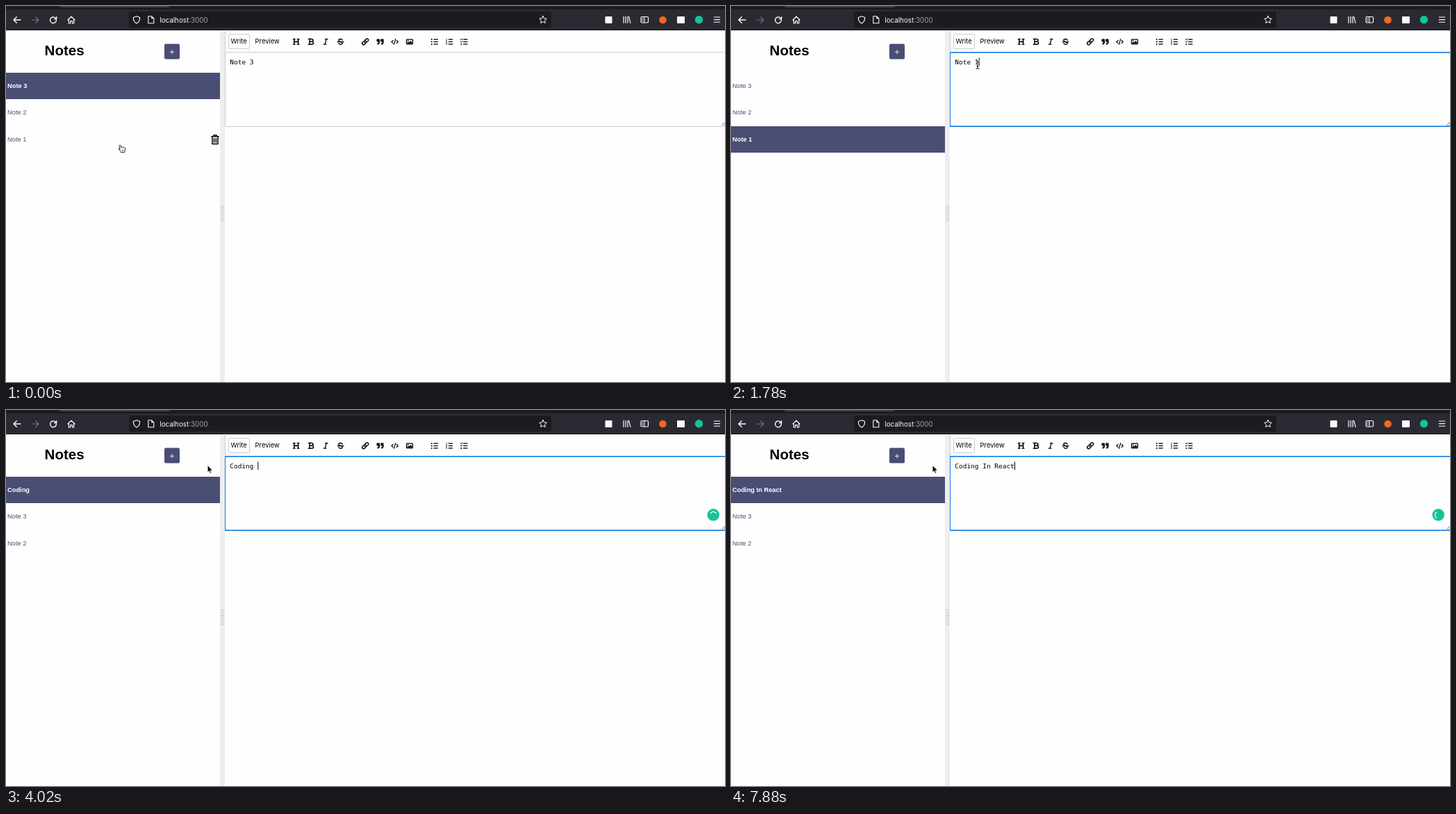
An HTML page with a canvas for the animation above (8 s loop, 1035 by 541 pixels).

```html
<!DOCTYPE html>
<html lang="en">
<head>
<meta charset="utf-8">
<title>Notes</title>
<style>
html, body { margin: 0; width: 100%; height: 100%; overflow: hidden; background: #fff; }
canvas { display: block; width: 1035px; height: 541px; }
</style>
</head>
<body>
<canvas id="stage" width="1035" height="541"></canvas>
<script>
const ctx = document.getElementById('stage').getContext('2d');
const LOOP = 8000;
const SANS = '"Liberation Sans", Arial, sans-serif';
const UI = 'Inter, sans-serif';
const MONO = '"DejaVu Sans Mono", monospace';
const INDIGO = '#4a4e74', INK = '#000', PALE = '#fbfbfe', BORDER = '#c8ccd0', TEAL = '#15c39a';
const CHAR = 5.71, TEXT_X = 322.3;

// Runs of evenly spaced picture changes: first, last, count
const RUNS = [[0, 0, 1], [450, 750, 2], [1050, 1930, 7], [2110, 3120, 7], [3270, 4310, 8],
  [4460, 5500, 8], [5650, 6690, 8], [6830, 7730, 7], [7880, 7880, 1]];
const TYPED = 'Coding In React';
const KEYS = [3120, 3270, 3420, 3570, 3720, 3870, 4020, 4460, 4610, 4910, 5200, 5500, 6095, 6390, 6540];
const FOCUS = 1650, SPINNER = 2610, SPIN = 766, BLINK = 567;

// ---------- drawing helpers ----------
function rect(x, y, w, h, color) {
  ctx.fillStyle = color;
  ctx.fillRect(x, y, w, h);
}
function round(x, y, w, h, r, color) {
  ctx.fillStyle = color;
  ctx.beginPath();
  ctx.roundRect(x, y, w, h, r);
  ctx.fill();
}
function frame(x, y, w, h, r, color, width) {
  ctx.strokeStyle = color;
  ctx.lineWidth = width;
  ctx.beginPath();
  ctx.roundRect(x, y, w, h, r);
  ctx.stroke();
}
function disc(x, y, r, color) {
  ctx.fillStyle = color;
  ctx.beginPath();
  ctx.arc(x, y, r, 0, 7);
  ctx.fill();
}
function arc(x, y, r, a, b, color, width) {
  ctx.strokeStyle = color;
  ctx.lineWidth = width;
  ctx.beginPath();
  ctx.arc(x, y, r, a, b);
  ctx.stroke();
}
function text(str, x, y, font, color, align = 'left') {
  ctx.font = font;
  ctx.fillStyle = color;
  ctx.textAlign = align;
  ctx.fillText(str, x, y);
}
function path(d, x, y, { fill, stroke, width = 1, scale = 1 }) {
  const p = new Path2D(d);
  ctx.save();
  ctx.translate(x, y);
  ctx.scale(scale, scale);
  ctx.lineJoin = ctx.lineCap = 'round';
  if (fill) { ctx.fillStyle = fill; ctx.fill(p); }
  if (stroke) { ctx.strokeStyle = stroke; ctx.lineWidth = width; ctx.stroke(p); }
  ctx.restore();
}
const line = (d, x, y, color, width) => path(d, x, y, { stroke: color, width });

// ---------- browser bar ----------
function browser() {
  rect(0, 0, 1035, 35, '#2b2a33');
  rect(0, 0, 1035, 5, '#1c1b22');
  round(77, -4, 159, 6, 2, '#42414d');
  rect(0, 34, 1035, 1, '#0c0c0d');
  round(177, 8, 608, 23, 3, '#1c1b22');

  line('M10 0H0M4.3-4.3L0 0L4.3 4.3', 11, 20, PALE, 1.4);
  line('M0 0H10M5.7-4.3L10 0L5.7 4.3', 37, 20, '#77767e', 1.2);
  arc(68, 20.3, 4.4, -0.2, 5.3, PALE, 1.4);
  path('M0 0V4.8H-4.8Z', 73.3, 14.4, { fill: PALE });
  line('M-5 0L0-4.8L5 0M-3.7-1V5H-1.4V1.6H1.4V5H3.7V-1', 94, 20, PALE, 1.2);

  line('M0-5L4.7-3.3C4.7 1 3.5 3.6 0 5.4C-3.5 3.6-4.7 1-4.7-3.3Z', 188, 19.7, PALE, 1.1);
  line('M0 0H5L8 3V10H0ZM5 0V3H8', 204.8, 14.8, PALE, 1.1);
  text('localhost', 221.3, 23.5, '9.8px ' + UI, PALE);
  const w = ctx.measureText('localhost').width;
  text(':3000', 221.3 + w, 23.5, '9.8px ' + UI, '#a2a2ab');

  let star = '';
  for (let i = 0; i < 10; i++) {
    const a = i * Math.PI / 5, r = i % 2 ? 2.7 : 5.6;
    star += (i ? 'L' : 'M') + r * Math.sin(a) + ' ' + -r * Math.cos(a);
  }
  line(star + 'Z', 773, 20, PALE, 1);

  round(862.5, 15, 10, 10, 1, PALE);
  line('M0 0V9M3 0V9M6 0V9M7.6 0L10 9', 889, 15.3, PALE, 1.2);
  frame(914, 15.5, 10.5, 8.5, 1.5, PALE, 1.2);
  line('M0 0V8M-3 2H-2M-3 4H-2M-3 6H-2', 919, 15.8, PALE, 1.1);
  disc(945.5, 20, 5.3, '#ee6a1f');
  round(966, 15, 11, 10, 1, PALE);
  disc(997.5, 19.7, 5.7, TEAL);
  line('M0 0H8.5M0 3.6H8.5M0 7.2H8.5', 1019.2, 16, PALE, 1.1);
}

// ---------- sidebar ----------
function trash() {
  line('M0 0H10.4M3.2-.2V-2H7.2V-.2M1.2 .3V10.6H9.2V.3M3.8 3V8.2M6.6 3V8.2', 295.8, 187.8, INK, 1.5);
}
function sidebar(rows, active, hover) {
  text('Notes', 55.6, 71, 'bold 20.5px ' + SANS, INK);
  round(228, 54.5, 22, 22, 2, INDIGO);
  line('M-2.6 0H2.6M0-2.6V2.6', 239, 66.3, '#e8e8ee', 1);
  rows.forEach((name, i) => {
    const y = 96 + i * 38.5, on = i === active;
    if (on) rect(0, Math.floor(y), 308, 38, INDIGO);
    text(name, 2, y + 21.8, (on ? 'bold ' : '') + '9.3px ' + SANS, on ? '#fff' : INDIGO);
  });
  if (hover) trash();
  rect(308, 35, 7, 506, '#eee');
  for (let i = 0; i < 9; i++) rect(309, 287 + i * 2.65, 5, 1, '#c9c9c9');
}

// ---------- editor ----------
function toolbar() {
  rect(315, 36, 1, 138, BORDER);
  rect(315, 66, 720, 1, BORDER);
  rect(315, 173, 720, 1, BORDER);
  frame(320.5, 40.5, 30, 21, 1, BORDER, 1);
  text('Write', 323.5, 54.4, '9.4px ' + UI, INK);
  text('Preview', 358.6, 54.4, '9.4px ' + UI, INK);

  // heading, bold, italic, strike
  line('M1.6 0V7.6M7.4 0V7.6M1.6 3.8H7.4', 413.2, 47.6, INK, 1.6);
  line('M0 0H3.2M5.8 0H9M0 7.6H3.2M5.8 7.6H9', 413.2, 47.6, INK, 1.1);
  line('M1.6 0V7.6M0 0H4.2C7.4 0 7.4 3.6 4.2 3.6H1.6M4.2 3.6C8.2 3.6 8.2 7.6 4.2 7.6H0', 435.4, 47.6, INK, 1.5);
  line('M2.2 0H5.8M0 7.6H3.6M4 0L1.8 7.6', 457.3, 47.6, INK, 1.3);
  line('M7.3 1.6C6.4-.7 2-.6 2 1.9C2 3 3.2 3.6 4.8 4C8.8 5 7.6 7.9 4.9 7.8C3.2 7.8 2.4 7 2 6', 476.9, 47.6, INK, 1.4);
  line('M0 0H9.2', 477, 51.6, INK, 1.1);

  // link, quote, code, image
  line('M4 5.8C2.8 4.6 3 3.4 3.8 2.6L5.5 .9C7.8-1 10.3 1.6 8.4 3.7L7.4 4.7M5.2 3.4C6.4 4.6 6.2 5.8 5.4 6.6L3.7 8.3C1.4 10.2-1.1 7.6 .8 5.5L1.8 4.5', 512.6, 46.8, INK, 1.4);
  for (const x of [533.6, 539.2])
    path('M.6 0H3.6Q4.4 0 4.4 .8V5Q4.4 8 1.2 8H.8V6.4Q2.5 6.4 2.5 4.2H.6Q0 4.2 0 3.6V.8Q0 0 .6 0Z', x, 47.4, { fill: INK });
  line('M2.2 1.8L0 4L2.2 6.2M7.2 1.8L9.4 4L7.2 6.2M5.7 .2L3.7 7.8', 555, 47.5, INK, 1.2);
  frame(576.5, 48.1, 9, 6.8, 0.8, INK, 1.2);
  disc(578.8, 50.1, 0.9, INK);
  path('M0 3V1.7L1.4 .4L2.6 1.5L5-1L7 1V3Z', 577.5, 51, { fill: INK });

  // lists
  for (let i = 0; i < 3; i++) {
    const y = 48.1 + i * 3.4;
    for (const x of [615.6, 636.8, 658.2]) rect(x, y - 0.65, 6.2, 1.3, INK);
    disc(612.8, y, 1, INK);
    text(i + 1, 633, y + 1.4, 'bold 3.8px ' + SANS, INK);
    if (i < 2) line('M0 0L.9 .9L2.7-1.2', 654.2, y, INK, 1);
    else disc(655.4, y, 1, INK);
  }
}
function editor(s) {
  if (s.selected < 6) {
    rect(TEXT_X + s.selected * CHAR, 74, (6 - s.selected) * CHAR, 12, '#b0d5fb');
  }
  text(s.body, TEXT_X, 83.5, '9.48px ' + MONO, INK);
  if (s.focus) {
    rect(315, 66, 720, 1.6, '#0f7be6');
    rect(315, 172.4, 720, 1.6, '#0f7be6');
    rect(315, 66, 1, 108, '#0f7be6');
  }
  line('M0 5L5 0M3 5L5 3', 1030.5, 166.5, '#555', 0.8);
  if (s.caret) rect(TEXT_X + s.body.length * CHAR + 0.1, 74.5, 1, 11.5, INK);
  if (s.spin !== null) {
    disc(1018.2, 150.8, 8.7, TEAL);
    const mid = -Math.PI / 2 + s.spin * Math.PI * 2;
    ctx.lineCap = 'round';
    arc(1018.2, 151.2, 4.7, mid - 1, mid + 1, '#fff', 1.3);
  }
}

// ---------- pointer ----------
const SHAPES = {
  arrow(x, y) {
    path('M0 0V11L2.5 8.8L4.2 12.6L6 11.8L4.4 8.1H7.7Z', x, y, { fill: INK, stroke: '#fff', width: 0.8, scale: 0.9 });
  },
  beam(x, y) {
    const d = 'M-2.2-5.6Q0-5.6 0-4.2Q0-5.6 2.2-5.6M0-4.2V4.6M-2.2 6Q0 6 0 4.6Q0 6 2.2 6M-1.2 2H1.2';
    line(d, x, y, '#fff', 2);
    line(d, x, y, '#111', 1);
  },
  hand(x, y) {
    const d = 'M-2.7 1.2L-3.6-3.4C-3.9-5.2-2-5.6-1.6-4L-.9-1.5C-.6-2.6 1-2.5 1.2-1.4C1.6-2.3 3-2.1 3.2-.9C3.8-1.6 5-1.2 5 0C5.1 2 4.6 3 4 4V5.8H-1.3V4.6L-4.4 1.4C-5.2 .2-3.8-.5-2.7 1.2Z';
    path(d, x, y, { fill: '#fff', stroke: '#111', width: 0.9 });
    line('M.6 2V4M2.4 2V4', x, y, '#111', 0.6);
  }
};

// ---------- timeline ----------
const clamp = v => Math.max(0, Math.min(1, v));
const ease = v => { v = clamp(v); return v * v * (3 - 2 * v); };
const mix = (a, b, k) => a + (b - a) * k;

function hold(t) {
  let now = 0;
  for (const [first, last, count] of RUNS) {
    if (t < first) break;
    const gap = count > 1 ? (last - first) / (count - 1) : 1;
    now = first + gap * Math.min(count - 1, Math.floor((t - first + 8) / gap));
  }
  return now + 8;
}
function pointer(t) {
  if (t < 1050) return { x: t < 450 ? 166.7 : 167.3, y: 205, shape: 'hand' };
  if (t < 2000) {
    const k = ease((t - 950) / 650), x = mix(167.3, 355, k), y = mix(205, 84.5, k);
    const shape = x > 315 && y < 173 ? 'beam' : y > 173 ? 'hand' : 'arrow';
    return { x, y, shape };
  }
  const k = ease((t - 2000) / 560);
  return { x: mix(355, 290.2, k), y: mix(84.5, 79.8, k === 1 ? 1 : 0), shape: k === 1 ? 'arrow' : 'beam' };
}
function state(t) {
  const typed = KEYS.filter(k => k <= t).length;
  const old = t < 750 ? 'Note 3' : 'Note 1';
  const p = pointer(t);
  const focus = t >= FOCUS;
  const since = t - (typed ? KEYS[typed - 1] : FOCUS);
  let selected = 6;
  if (t > 2000 && !typed) selected = Math.max(0, Math.min(6, Math.round((p.x - TEXT_X) / CHAR)));
  return {
    p, focus, selected,
    body: typed ? TYPED.slice(0, typed) : old,
    rows: typed ? [TYPED.slice(0, typed).trim(), 'Note 3', 'Note 2'] : ['Note 3', 'Note 2', 'Note 1'],
    active: typed || t < 750 ? 0 : 2,
    hover: p.shape === 'hand',
    caret: focus && selected === 6 && Math.floor(since / BLINK) % 2 === 0,
    spin: t < SPINNER ? null : typed ? since / SPIN % 1 : 0
  };
}
function draw() {
  const s = state(hold(performance.now() % LOOP));
  rect(0, 0, 1035, 541, '#fefefe');
  browser();
  sidebar(s.rows, s.active, s.hover);
  toolbar();
  editor(s);
  SHAPES[s.p.shape](s.p.x, s.p.y);
  requestAnimationFrame(draw);
}
draw();
</script>
</body>
</html>
```
